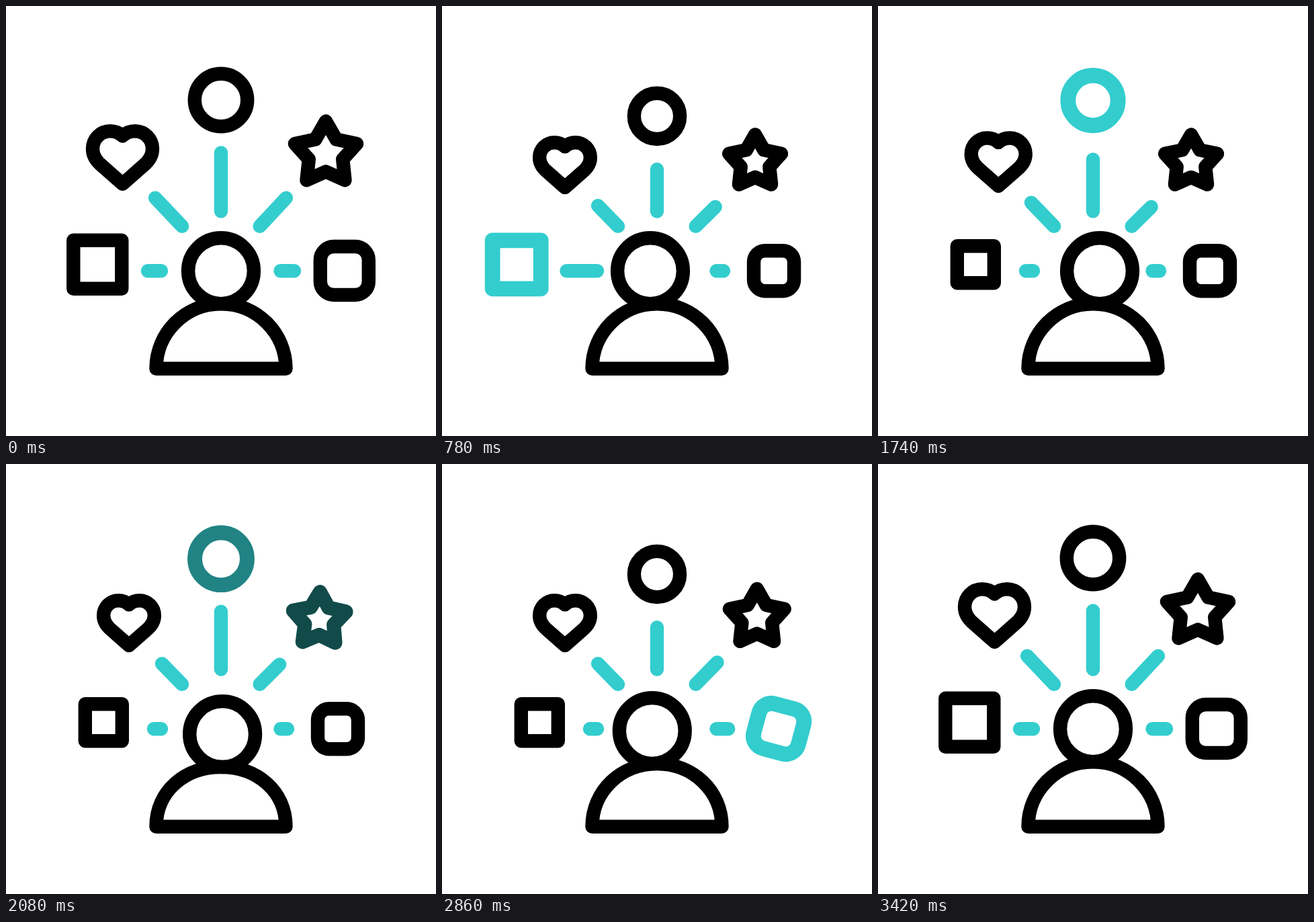
Animation of 640x640 px, one loop 3600 ms. Source, as an HTML page with a canvas:

```html
<!DOCTYPE html>
<html lang="en">
<head>
<meta charset="utf-8">
<title>Preferences</title>
<style>
  html, body { margin: 0; width: 100%; height: 100%; overflow: hidden; background: #fff; }
  canvas { display: block; width: 640px; height: 640px; }
</style>
</head>
<body>
<canvas id="stage" width="640" height="640"></canvas>
<script>
const ctx = document.getElementById('stage').getContext('2d');
const LOOP = 3600;
const TEAL = [51, 205, 206];
const BLACK = [0, 0, 0];
const THIN = 20.4, THICK = 22.8;

// moments at which the active shape reaches its pose
const KEYS = [200, 800, 1400, 2000, 2600, 3000, 3415];

// head offset: start, end, x, y
const HEAD = [
  [200, 600, -10, 0],
  [1000, 1400, 10, 0],
  [1800, 2200, 0, 10],
  [2600, 3000, -10, 0],
  [3000, 3415, 0, 0]
];

const clamp = v => Math.max(0, Math.min(1, v));
const smooth = v => { v = clamp(v); return v * v * (3 - 2 * v); };
const lerp = (a, b, k) => a + (b - a) * k;
const mix = (a, b, k) => a.map((v, i) => lerp(v, b[i], k));
const rgb = c => `rgb(${c.map(Math.round).join()})`;

function squarePath(s) {
  ctx.rect(-36 * s, -36 * s, 72 * s, 72 * s);
}

function roundedPath(s) {
  ctx.roundRect(-36 * s, -36 * s, 72 * s, 72 * s, 20 * s);
}

function circlePath(s) {
  ctx.arc(0, 0, 39.2 * s, 0, Math.PI * 2);
}

function starPath(s) {
  for (let i = 0; i < 10; i++) {
    const r = (i % 2 ? 26.5 : 48.5) * s;
    const a = i * Math.PI / 5;
    ctx.lineTo(r * Math.sin(a), 4.6 * s - r * Math.cos(a));
  }
  ctx.closePath();
}

function heartPath(s) {
  const half = d => {
    const x = d * s;
    ctx.moveTo(0, -32 * s);
    ctx.bezierCurveTo(-5 * x, -36.8 * s, -12 * x, -39.2 * s, -18.5 * x, -39.2 * s);
    ctx.bezierCurveTo(-33 * x, -39.2 * s, -44.5 * x, -27.5 * s, -44.5 * x, -13 * s);
    ctx.bezierCurveTo(-44.5 * x, -2 * s, -39 * x, 5.5 * s, -31 * x, 12 * s);
    ctx.lineTo(0, 39.3 * s);
  };
  half(1);
  half(-1);
}

// poses: x, y, scale, outer end of the ray (x, y)
const items = [
  { path: squarePath, root: [231, 394.2], turn: 0, hop: 0,
    rest: [136.3, 384.8, 1, 211, 394.2],
    near: [145.3, 384.8, 0.764, 220, 394.2],
    peak: [111.1, 384.8, 1, 185.4, 394.2] },
  { path: heartPath, root: [262, 327.8], turn: 14, hop: 0,
    rest: [173.5, 225.5, 1, 222, 285.6],
    near: [183, 236.6, 0.85, 232, 297.2] },
  { path: circlePath, root: [320, 305.5], turn: 0, hop: 9.5,
    rest: [320, 140, 1, 320, 218.5],
    near: [320, 164, 0.87, 320, 243.3] },
  { path: starPath, root: [377.7, 327.8], turn: 12, hop: 0,
    rest: [476, 215.4, 1, 417, 285.6],
    near: [466, 228.6, 0.845, 406.7, 299] },
  { path: roundedPath, root: [408.5, 394.2], turn: 15, hop: 0,
    rest: [503.8, 394, 1, 429, 394.2],
    near: [494, 394.2, 0.833, 419, 394.2] }
];

function poseAt(item, index, key) {
  if (key === 0 || key === KEYS.length - 1) return item.rest;
  return key === index + 1 ? item.peak || item.rest : item.near;
}

function stroke(color, width) {
  ctx.strokeStyle = rgb(color);
  ctx.lineWidth = width;
  ctx.stroke();
}

function drawItem(item, index, seg, u, swap) {
  const pose = mix(poseAt(item, index, seg), poseAt(item, index, seg + 1), smooth(u));
  const [x, y, scale, rx, ry] = pose;
  const lit = index === seg ? swap : index === seg - 1 ? 1 - swap : 0;
  let bump = 0;
  if (index === seg) bump = u < 2 / 3 ? smooth(u * 1.5) : smooth((1 - u) * 3);

  ctx.beginPath();
  ctx.moveTo(...item.root);
  ctx.lineTo(rx, ry);
  stroke(TEAL, THIN);

  ctx.save();
  ctx.translate(x, y - item.hop * bump);
  ctx.rotate(item.turn * bump * Math.PI / 180);
  ctx.beginPath();
  item.path(scale);
  stroke(mix(BLACK, TEAL, lit), lerp(THIN, THICK, lit));
  ctx.restore();
}

function drawPerson(t) {
  let pos = [0, 0];
  for (const [from, to, x, y] of HEAD) {
    pos = mix(pos, [x, y], smooth((t - from) / (to - from)));
  }
  const [dx, dy] = pos;
  const top = 443.2 + dy, base = 539.7;

  ctx.beginPath();
  ctx.moveTo(223.5, base);
  ctx.bezierCurveTo(223.5, 486.4, 266.7, top, 320, top);
  ctx.bezierCurveTo(373.3, top, 416.5, 486.4, 416.5, base);
  ctx.closePath();
  stroke(BLACK, THIN);

  ctx.beginPath();
  ctx.arc(320 + dx, 394.2 + dy, 48.9, 0, Math.PI * 2);
  stroke(BLACK, THIN);
}

function draw(t) {
  let seg = 0;
  while (seg < KEYS.length - 2 && t >= KEYS[seg + 1]) seg++;
  const u = clamp((t - KEYS[seg]) / (KEYS[seg + 1] - KEYS[seg]));
  const swap = smooth((t - KEYS[seg]) / 200);

  ctx.fillStyle = '#fff';
  ctx.fillRect(0, 0, 640, 640);
  ctx.lineCap = ctx.lineJoin = 'round';
  items.forEach((item, i) => drawItem(item, i, seg, u, swap));
  drawPerson(t);
}

const start = performance.now();
function tick() {
  draw((performance.now() - start) % LOOP);
  requestAnimationFrame(tick);
}
tick();
</script>
</body>
</html>
```
